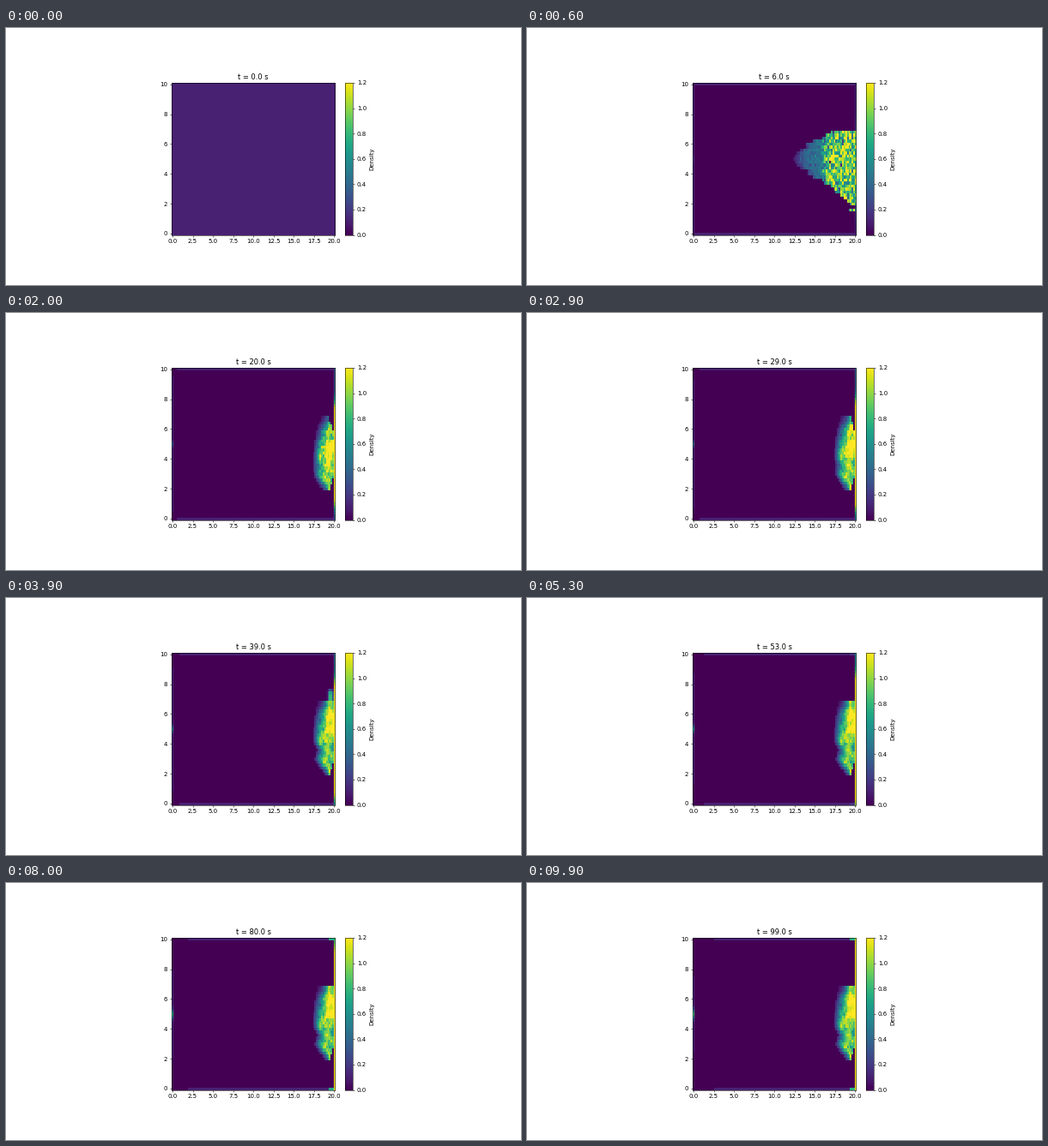
A matplotlib script for the animation above (10000 ms loop, 600 by 300 pixels).

```python
import numpy as np
import matplotlib.pyplot as plt
from matplotlib.animation import FuncAnimation

W, H, DPI = 600, 300, 50
STEPS, INTERVAL = 100, 100
RHO0, SPEED, VMAX = 0.11, 2.08, 1.2
EXIT_Y = 5.0
OUTSIDE = 21

x = np.linspace(0, 20, 101)
y = np.linspace(0, 10, 51)
X, Y = np.meshgrid(x, y)
DY = Y - EXIT_Y
DIST = np.hypot(20.3 - X, DY * 0.8)
ROWS = np.random.default_rng(3).normal(size=(len(y), 1))
GRAIN = np.random.default_rng(4).normal(size=X.shape)
PATCH = sum(np.roll(GRAIN, (i, j), (0, 1))
            for i in (-1, 0, 1) for j in (-1, 0, 1)) / 3


def smooth(a, b, v):
    u = np.clip((v - a) / (b - a), 0, 1)
    return u * u * (3 - 2 * u)


def bell(v, mid, width):
    return np.exp(-((v - mid) / width) ** 2)


def noise(t):
    return np.random.default_rng(100 + int(t)).normal(size=X.shape)


def within(edge, low, high):
    return np.where((Y > low) & (Y < high), edge, OUTSIDE)


def funnel():
    """Left outline of the crowd as it reaches the exit."""
    edge = 12.4 + 7.4 * (1 - bell(DY, 0, 1.9))
    return within(edge + 0.35 * ROWS * smooth(0.3, 1, abs(DY)), 1.5, 6.9)


def mound(late):
    """Left outline of the waiting crowd, splitting into two lobes."""
    edge = 17.35 + 0.11 * (Y - 3.8 - 0.6 * late) ** 2
    edge = edge + 0.8 * np.maximum(0, 2.9 - Y) + 0.4 * late * bell(Y, 3.6, 0.35)
    return within(edge, 1.8, 6.9)


def inflow(t):
    """Crowd converging on the exit and piling up in front of it."""
    edge = SPEED * t + 1.5 * (t / 6) ** 2 * DY ** 2
    edge = edge + (funnel() - edge) * smooth(3, 6, t)
    rho = RHO0 * (1 + 1.25 * SPEED * t / DIST)
    rho *= 1 + 0.12 * noise(t) * (X > 20 - 1.2 * t)
    jam = smooth(1.2, 0, DIST - 0.6 * t)
    rho += (0.88 + 0.27 * noise(t) + 0.1 * ROWS - rho) * jam
    rho *= smooth(-0.1, 0.1 + 0.3 * t * bell(DY, 0, 1.5), X - edge + 0.1 * t)
    return np.where(X >= edge, rho, 0)


def queue(t):
    """Slowly settling crowd held at the exit."""
    late = smooth(20, 40, t)
    fresh = np.exp(-(t - 6) / 9)
    start = funnel()
    edge = start + (mound(late) - start) * smooth(6, 10, t)
    depth = X - edge
    rho = 0.12 + 0.7 * smooth(-0.1, 1 + 0.4 * smooth(4.6, 6, Y), depth)
    rho += 0.42 * bell(X, 19.6, 0.85) * bell(Y, 4.4 + 1.2 * late, 1.1)
    rho += (0.1 + 0.2 * fresh) * bell(X, 19.2, 0.5) * bell(Y, 4.2, 1.3)
    shake = 0.07 * GRAIN + 0.1 * PATCH + (0.03 + 0.3 * fresh) * noise(t)
    rho += shake * smooth(0.1, 1, depth)
    rho *= 1 - 0.5 * smooth(5.8, 6.8, Y) * smooth(19.2 + 1.5 * (1 - late), 18.2, X)
    right = 19.85 - 0.3 * smooth(3, 2, Y)
    right = right - 0.6 * (1 - late) * np.maximum(0, Y - 5.8)
    right = right + (20.1 - right) * smooth(12, 7, t)
    rho = np.where((depth >= 0) & (X <= right), rho, 0)
    spur = 0.9 * bell(t, 39, 4) * bell(X, 19.5, 0.3) * smooth(7.8, 7.3, Y)
    return np.where(Y > 6.9, spur, rho)


def walls(rho, t):
    """Thin layer that creeps along the four sides."""
    creep = 0.025 * t
    side = np.where(x >= creep, RHO0, 0)
    side = side + 0.65 * smooth(45, 85, t) * (x > 19.3)
    rho[0], rho[-1] = side, side
    left = np.where(abs(y - EXIT_Y) < 5 - creep, RHO0, 0)
    bump = bell(y, EXIT_Y, 0.15 + 0.002 * t)
    rho[:, 0] = left + 0.9 * (1 - np.exp(-t / 60)) * bump
    end = 0.15 + 0.0075 * t
    off = abs(y - 4.3) - 2.2 - 0.028 * t
    col = end + (1.25 - end) * smooth(1.6, 0, off)
    near = np.maximum(rho[:, -1], RHO0)
    rho[:, -1] = near + (col - near) * smooth(4, 15, t)
    return rho


def density(t):
    if t == 0:
        return np.full(X.shape, RHO0)
    return np.clip(walls(inflow(t) if t <= 6 else queue(t), t), 0, VMAX)


def box(x0, y0, x1, y1):
    return [x0 / W, 1 - y1 / H, (x1 - x0) / W, (y1 - y0) / H]


plt.rcParams["font.family"] = "DejaVu Sans"
fig = plt.figure(figsize=(W / DPI, H / DPI), dpi=DPI)
ax = fig.add_axes(box(193, 64, 383.4, 241.6))
cax = fig.add_axes(box(395.1, 64, 404.1, 241.6))
mesh = ax.imshow(density(0), origin="lower", aspect="auto", cmap="viridis",
                 vmin=0, vmax=VMAX, interpolation="nearest",
                 extent=(-0.1, 20.1, -0.1, 10.1))
ax.set_xticks(np.arange(0, 20.1, 2.5))
ax.set_yticks(range(0, 11, 2))
title = ax.set_title("t = 0.0 s")
fig.colorbar(mesh, cax=cax, label="Density")


def update(n):
    mesh.set_data(density(float(n)))
    title.set_text(f"t = {n:.1f} s")
    return mesh, title


anim = FuncAnimation(fig, update, frames=STEPS, interval=INTERVAL,
                     repeat=True, repeat_delay=0)
plt.show()
```
